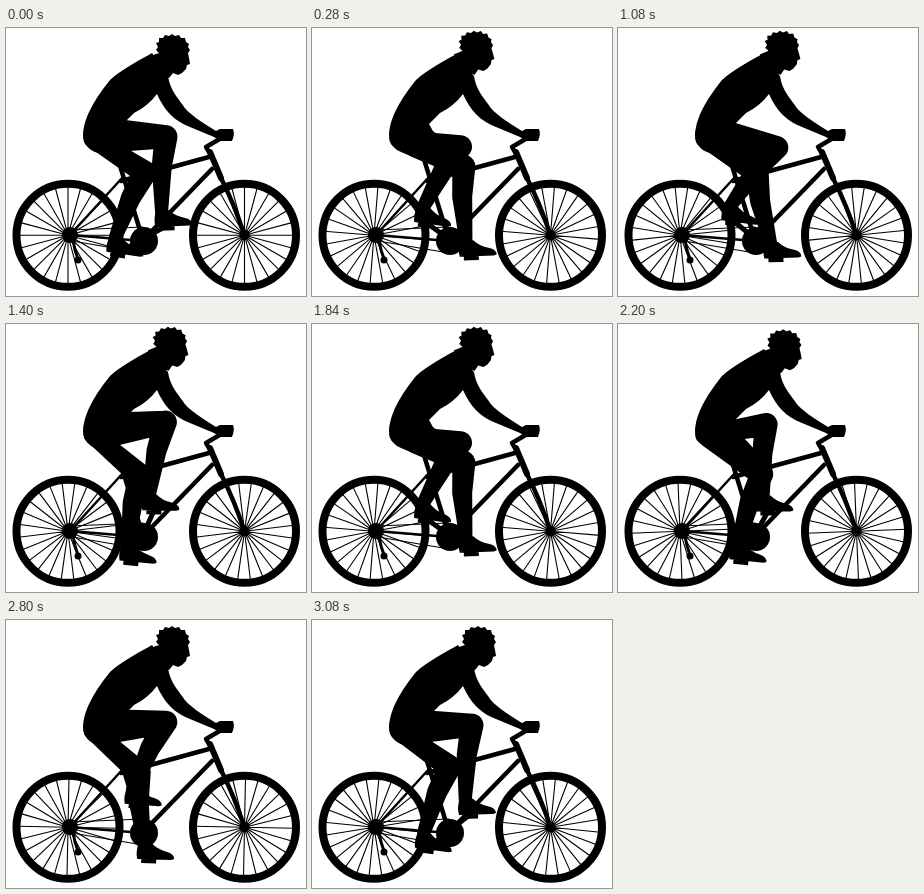
Recreate the animation shown at these times as an HTML page. Size 300 by 268 pixels, loop 3120 ms.

```html
<!DOCTYPE html>
<html lang="en">
<head>
<meta charset="utf-8">
<title>Cyclist</title>
<style>
  html, body { margin: 0; width: 100%; height: 100%; overflow: hidden; background: #fff; }
  svg { display: block; width: 100%; height: 100%; }
  .line { fill: none; stroke: #000; stroke-linecap: round; stroke-linejoin: round; }
</style>
</head>
<body>
<svg viewBox="0 0 300 268">
  <g id="wheels"></g>

  <g class="line" stroke-width="4.5">
    <path d="M111 128L137 212M115 153L203 129M206 141L142 207" />
    <path d="M64 207L117 149M64 207L137 213" stroke-width="2.5" />
    <path d="M64 202L137 199M66 213L137 225" stroke-width="1.2" />
    <path d="M204 124L215 150" stroke-width="6" />
    <path d="M215 150Q229 178 238 206" />
    <path d="M204 126L200 119L217 109" />
    <path d="M67 212L69 222L72 231" stroke-width="3" />
  </g>
  <circle cx="64" cy="207" r="8" />
  <circle cx="238.5" cy="207" r="5" />
  <circle cx="72" cy="232" r="3.5" />
  <circle cx="138" cy="213" r="14" />
  <path d="M84 116Q94 125 108 127L119 131L112 134L98 128Z" />

  <path id="crank" class="line" stroke-width="5" />
  <path id="farLeg" />
  <path id="farFoot" />
  <path id="nearLeg" />
  <path id="nearFoot" />

  <path d="M160 46L146 25C136 31 114 42 104 52C96 62 80 83 77.5 102C77 109 80 115 84 118L98 126
    L112 122L122 105L117 96L128 85Q142 78 151 66C158 82 168 93 184 99L208 109L214 113L226 113
    Q229 106 227 101L214 101L210 103C196 94 182 86 176 76C172 70 164 62 162 48Z" />
  <path id="head" d="M144 28L153 25L150 22L152 19L150 15L153 14L153 10L157 10L159 7L163 8L166 6
    L169 8L173 7L175 10L179 10L180 14L183 16L182 19L184 22L182 25L183 30L184 36L181 37L180 41
    L176 45L172 47L167 45L163 50L150 45Z" />
</svg>
<script>
const LOOP = 3120, STEP = 40, TURN_FRAMES = 39;
const AXLE = { x: 137, y: 211 }, CRANK = 28;
const NEAR = { name: 'near', hip: { x: 95, y: 107 }, hipRadius: 18, thigh: 65, shin: 75 };
const FAR = { name: 'far', hip: { x: 87, y: 111 }, hipRadius: 9, thigh: 62, shin: 72 };
const SHOE = 'M-11 -15L2 -15Q8 -9 17 -7Q25 -5 25 0L22 1L-12 1Q-14 -6 -11 -15Z';
const PEDAL = 'M-8 1H7V5H-8Z';
const RAD = Math.PI / 180;
const byId = id => document.getElementById(id);
const clamp01 = v => Math.max(0, Math.min(1, v));
const smooth = v => { const k = clamp01(v); return k * k * (3 - 2 * k); };
const polar = (c, r, a) => ({ x: c.x + r * Math.cos(a), y: c.y + r * Math.sin(a) });
const mix = (p, q, k) => ({ x: p.x + (q.x - p.x) * k, y: p.y + (q.y - p.y) * k });
const fmt = p => p.x.toFixed(2) + ' ' + p.y.toFixed(2);

function makeWheel(cx, cy) {
  let spokes = '';
  for (let i = 0; i < 24; i++) {
    spokes += 'M0 0L' + fmt(polar({ x: 0, y: 0 }, 50, i * 15 * RAD));
  }
  return `<g transform="translate(${cx} ${cy})">
    <circle class="line" r="51.5" stroke-width="8"/>
    <path class="line spin" d="${spokes}" stroke-width="1.1"/></g>`;
}

// Tapered capsule between two joints
function limb(p, q, rp, rq) {
  const dir = Math.atan2(q.y - p.y, q.x - p.x);
  const half = Math.acos((rp - rq) / Math.hypot(q.x - p.x, q.y - p.y));
  const at = (c, r, side) => fmt(polar(c, r, dir + side * half));
  return `M${at(p, rp, 1)}A${rp} ${rp} 0 1 1 ${at(p, rp, -1)}` +
    `L${at(q, rq, -1)}A${rq} ${rq} 0 0 1 ${at(q, rq, 1)}Z`;
}

function findKnee({ hip, thigh, shin }, ankle) {
  const d = Math.min(thigh + shin - 0.1, Math.hypot(ankle.x - hip.x, ankle.y - hip.y));
  const bend = Math.acos((thigh ** 2 + d * d - shin ** 2) / (2 * thigh * d));
  return polar(hip, thigh, Math.atan2(ankle.y - hip.y, ankle.x - hip.x) - bend);
}

function poseLeg(leg, angle) {
  const pedal = polar(AXLE, CRANK, angle);
  const tilt = 3 - 6 * Math.cos(angle);
  const ankle = polar(pedal, 15, (249 + tilt) * RAD);
  const knee = findKnee(leg, ankle);
  const shinDir = Math.atan2(ankle.y - knee.y, ankle.x - knee.x);
  const calf = polar(mix(knee, ankle, 0.4), 2.5, shinDir + Math.PI / 2);
  byId(leg.name + 'Leg').setAttribute('d',
    limb(leg.hip, knee, leg.hipRadius, 11.5) + limb(knee, calf, 11.5, 10) + limb(calf, ankle, 10, 6.5));
  const foot = byId(leg.name + 'Foot');
  foot.setAttribute('d', SHOE + PEDAL);
  foot.setAttribute('transform', `translate(${fmt(pedal)}) rotate(${tilt.toFixed(2)})`);
  return pedal;
}

function draw(ms) {
  const frame = Math.floor((ms % LOOP) / STEP);
  const turn = frame / TURN_FRAMES * 360;
  const angle = (turn - 29) * RAD;

  const near = poseLeg(NEAR, angle);
  const far = poseLeg(FAR, angle + Math.PI);
  byId('crank').setAttribute('d', `M${fmt(near)}L${fmt(far)}`);

  for (const wheel of document.querySelectorAll('.spin')) {
    wheel.setAttribute('transform', `rotate(${turn.toFixed(2)})`);
  }

  const lift = smooth(frame / 6) - smooth((frame - 50) / 7);
  byId('head').setAttribute('transform',
    `translate(${-lift} ${-2.5 * lift}) rotate(${-5 * lift} 155 42)`);
}

byId('wheels').innerHTML = makeWheel(62, 207.3) + makeWheel(238.5, 207.3);
const start = performance.now();
function tick() {
  draw(performance.now() - start);
  requestAnimationFrame(tick);
}
tick();
</script>
</body>
</html>
```
